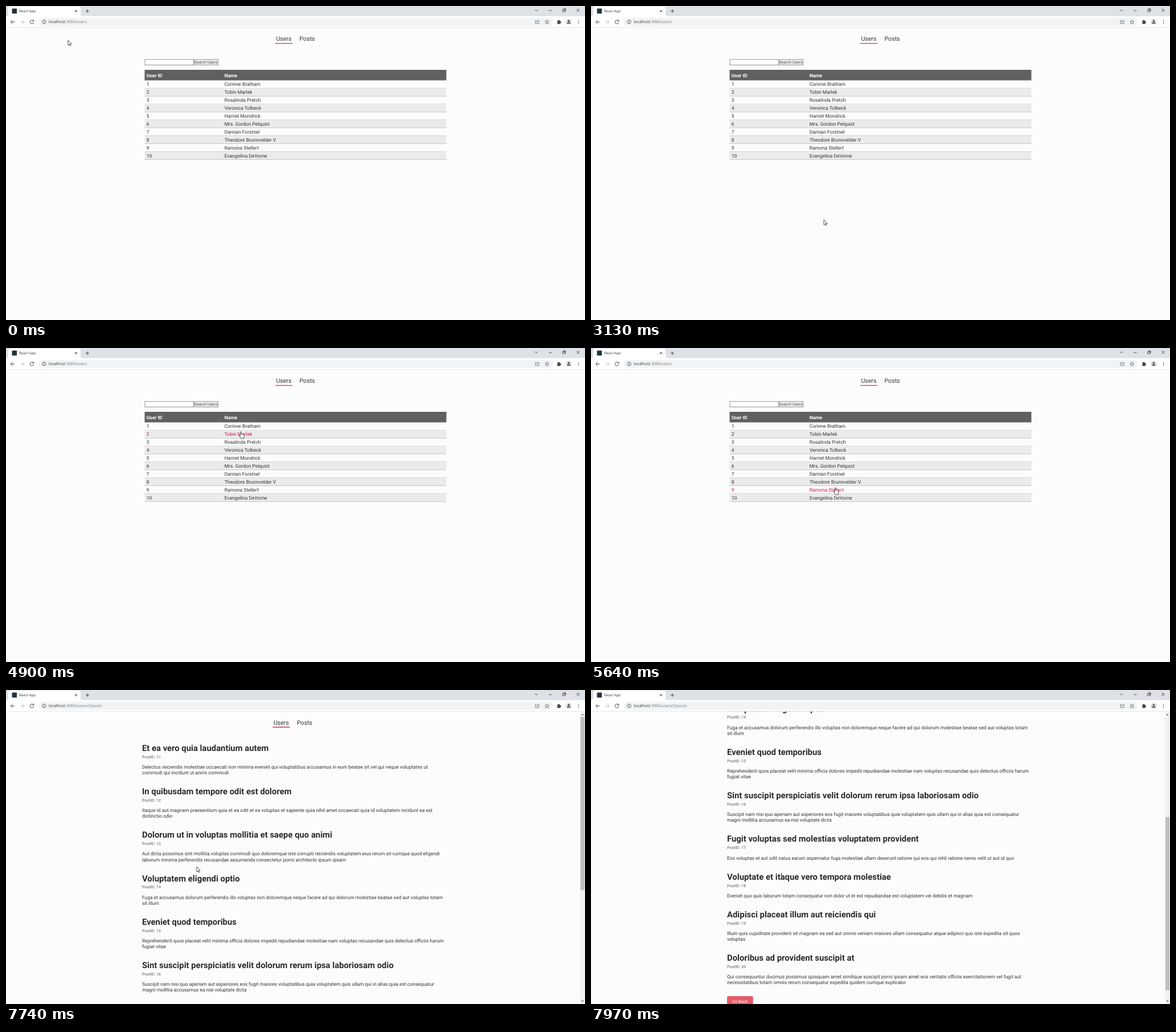
Write an HTML page that moves like this. It is 1017 px wide and 551 px high and loops after 8 s.

```html
<!DOCTYPE html>
<html lang="en">
<head>
<meta charset="utf-8">
<title>React App</title>
<style>
  html, body { margin: 0; width: 100%; height: 100%; overflow: hidden; background: #fcfcfc; }
  svg { display: block; position: absolute; left: 0; top: 0; }
  text { font-family: Roboto, sans-serif; font-size: 8.475px; fill: #333; white-space: pre; text-rendering: geometricPrecision; }
  .ui { font-family: "Open Sans", sans-serif; font-size: 6.95px; }
  .nav { font-size: 10.6px; }
  .th { font-weight: 700; fill: #fff; }
  .key { font-weight: 500; fill: #fff; }
  .btn { font-size: 7.42px; fill: #fff; }
  .title { font-size: 14.83px; font-weight: 700; fill: #2b2b2b; }
  .id { font-size: 7.05px; font-weight: 700; fill: #8c8c8c; }
  .hover text { fill: #d0145a; }
  .icon { fill: none; stroke: #45494d; stroke-width: 1; }
</style>
</head>
<body>
<svg id="stage" width="1017" height="551" viewBox="0 0 1017 551"></svg>
<script>
const LOOP = 8000, DETAIL_AT = 6670, POSTS_AT = 7100, HOVER_LAG = 60;
const ROW_TOP = 130.5, ROW_H = 13.9;

const people = ['Corinne Bratham', 'Tobin Marlek', 'Rosalinda Pretch', 'Veronica Tolbeck', 'Harriet Mondrick',
  'Mrs. Gordon Pelquist', 'Damian Forstnel', 'Theodore Brunnvelder V', 'Ramona Stellert', 'Evangelina DeVorne'];

const details = [['Name', people[1]], ['Username', 'Quillanne'], ['Email', 'Tamsy@velmora.test'],
  ['Address', 'Corbin Meadow, Suite 412, Tandelburgh, 30418-2257'], ['Phone', '000-555-0147 x20386'],
  ['Website', 'tamsyline.test'], ['Company', 'Brondel-Kusk']];

const posts = [
  ['Et ea vero quia laudantium autem',
    'Delectus reiciendis molestiae occaecati non minima eveniet qui voluptatibus accusamus in eum beatae sit vel qui neque voluptates ut',
    'commodi qui incidunt ut animi commodi'],
  ['In quibusdam tempore odit est dolorem',
    'Itaque id aut magnam praesentium quia et ea odit et ea voluptas et sapiente quia nihil amet occaecati quia id voluptatem incidunt ea est',
    'distinctio odio'],
  ['Dolorum ut in voluptas mollitia et saepe quo animi',
    'Aut dicta possimus sint mollitia voluptas commodi quo doloremque iste corrupti reiciendis voluptatem eius rerum sit cumque quod eligendi',
    'laborum minima perferendis recusandae assumenda consectetur porro architecto ipsum ipsam'],
  ['Voluptatem eligendi optio',
    'Fuga et accusamus dolorum perferendis illo voluptas non doloremque neque facere ad qui dolorum molestiae beatae sed aut voluptas totam',
    'sit illum'],
  ['Eveniet quod temporibus',
    'Reprehenderit quos placeat velit minima officia dolores impedit repudiandae molestiae nam voluptas recusandae quis delectus officiis harum',
    'fugiat vitae'],
  ['Sint suscipit perspiciatis velit dolorum rerum ipsa laboriosam odio',
    'Suscipit nam nisi quo aperiam aut asperiores eos fugit maiores voluptatibus quia voluptatem quis ullam qui in alias quia est consequatur',
    'magni mollitia accusamus ea nisi voluptate dicta'],
  ['Fugit voluptas sed molestias voluptatem provident',
    'Eos voluptas et aut odit natus earum aspernatur fuga molestiae ullam deserunt ratione qui eos qui nihil ratione nemo velit ut aut id quo'],
  ['Voluptate et itaque vero tempora molestiae',
    'Eveniet quo quis laborum totam consequatur non dolor ut et est repudiandae est voluptatem vel debitis et magnam'],
  ['Adipisci placeat illum aut reiciendis qui',
    'Illum quis cupiditate provident sit magnam ea sed aut omnis veniam maiores ullam consequatur atque adipisci quo iste expedita sit quos',
    'voluptas'],
  ['Doloribus ad provident suscipit at',
    'Qui consequuntur ducimus possimus quisquam amet similique suscipit porro ipsam amet eos veritatis officiis exercitationem vel fugit aut',
    'necessitatibus totam omnis rerum consequatur expedita quidem cumque explicabo']
];

// time, x, y of the pointer tip
const path = [
  [0, 109, 60], [150, 112, 62], [520, 400, 140], [800, 420, 255], [1030, 425, 122], [1100, 425, 126],
  [1160, 424, 162], [1380, 418, 255], [1640, 420, 138], [1960, 412, 260], [2250, 416, 140],
  [2520, 412, 245], [2900, 410, 345], [3130, 409, 375], [3300, 411, 250], [3520, 414, 140],
  [3800, 416, 255], [4120, 414, 140], [4480, 410, 371], [4800, 412, 152], [4900, 412.5, 147],
  [5100, 440, 146], [5350, 505, 210], [5600, 430, 255], [5820, 420, 150], [6120, 470, 255],
  [6420, 400, 151], [6640, 394, 149], [6770, 306.5, 253], [7080, 306.5, 253], [7350, 335, 310],
  [7750, 335, 310], [7970, 334.5, 327]
];
const scrollKeys = [[7745, 0], [7800, 45], [7970, 298]];

const rect = (x, y, w, h, fill, more = '') => `<rect x="${x}" y="${y}" width="${w}" height="${h}" fill="${fill}" ${more}/>`;
const text = (x, y, s, cls = '') => `<text x="${x}" y="${y}" class="${cls}">${s}</text>`;
const icon = (d, more = '') => `<path class="icon" d="${d}" ${more}/>`;
const button = (x, y, w, s) => rect(x, y, w, 17, '#e95864', 'rx="2"') + text(x + 9, y + 11.3, s, 'btn');
const nav = (x, y, color) => text(x, 61, 'Users', 'nav') + text(x + 41.1, 61, 'Posts', 'nav') + rect(x - 1.4, y, 30.4, 1.3, color);

function usersPage() {
  let s = nav(474.4, 65, '#e0345a')
    + rect(243.9, 93.9, 85.3, 9.7, '#fff', 'stroke="#7c7c7c" stroke-width=".8"')
    + rect(329.9, 93.9, 42.8, 9.7, '#efefef', 'stroke="#7c7c7c" stroke-width=".8"')
    + `<text x="330.6" y="101.3" style="font-size:6.98px;fill:#4a4a4a">Search Users</text>`
    + rect(243.5, 112, 530, 18.5, '#606062')
    + text(246.8, 124.6, 'User ID', 'th') + text(383.7, 124.6, 'Name', 'th');
  people.forEach((name, i) => {
    const y = ROW_TOP + i * ROW_H;
    if (i % 2) s += rect(243.5, y, 530, ROW_H, '#ebebeb');
    s += rect(243.5, y + ROW_H - .5, 530, .8, '#bcbcc2')
      + `<g class="row">${text(246.8, y + 9.9, i + 1) + text(383.7, y + 9.9, name)}</g>`;
  });
  return s;
}

function detailPage() {
  let s = nav(474.4, 65, '#e0345a') + rect(243.5, 93, 99.2, 134.4, '#606062');
  details.forEach(([key, value], i) => {
    const y = 93 + i * 19.17;
    s += text(246.8, y + 12.5, key, 'key') + text(346, y + 12.5, value) + rect(342.7, y + 18.6, 430.8, .8, '#bcbcc8');
  });
  return s + button(243.5, 246.2, 45.6, 'Go Back') + button(302, 246.2, 67.7, 'See Blog Posts');
}

function postsPage() {
  let s = nav(469.9, 64.5, '#b8144e'), y = 106.6;
  posts.forEach(([title, ...lines], i) => {
    s += text(239, y, title, 'title') + text(239, y + 12.9, 'PostID: ' + (11 + i), 'id');
    lines.forEach((line, n) => s += text(239, y + 31.1 + n * 10.25, line));
    y += lines.length > 1 ? 76.3 : 66.2;
  });
  return s + button(239, 835.2, 45.6, 'Go Back');
}

function chromeBar() {
  return rect(0, 0, 1017, 18, '#dee1e6')
    + '<path fill="#fff" d="M0 18q4 0 4-4V5q0-4 4-4H127q4 0 4 4v9q0 4 4 4z"/>'
    + rect(0, 17.8, 1017, 19.7, '#fff') + rect(0, 37.2, 1017, .7, '#dcdee0')
    + rect(10.5, 4.6, 8.6, 8.6, '#20343c', 'rx="1"')
    + `<text x="23" y="11.3" class="ui" style="font-size:6.2px">React App</text>`
    + icon('M121 7l4 4m0-4l-4 4M140 9h6m-3-3v6M929 6.3l2.6 2.6 2.6-2.6M953.5 8h5M1002.4 5l5 5m0-5l-5 5')
    + icon('M977.8 6.2h3.8v3.8h-3.8zM979.2 6V4.9h3.8v3.8h-1.2', 'stroke-width=".8"')
    + icon('M15.3 28H8.4m3.2-3.2L8.4 28l3.2 3.2')
    + icon('M25.2 28h6.9m-3.2-3.2l3.2 3.2-3.2 3.2', 'style="stroke:#babdc1"')
    + icon('M48.3 26a3.3 3.3 0 1 0 .5 2.6M48.9 24.4v2.3h-2.4')
    + rect(57.5, 21, 903, 14, '#f1f3f4', 'rx="7"')
    + '<circle class="icon" cx="67" cy="27.8" r="3.2" style="stroke-width:.8"/>' + icon('M67 27.3v2.2M67 25.8v.8', 'style="stroke-width:.8"')
    + '<text x="75" y="30.3" class="ui">localhost<tspan id="url" fill="#74787c"></tspan></text>'
    + icon('M932.3 25.5h-2.3v5.3h6.4v-1.6M932.2 29q.2-2.7 4-2.7m-1.4-1.8l1.8 1.8-1.8 1.8', 'style="stroke-width:.7"')
    + icon('M950.3 24.4l1 2.4 2.6.2-2 1.7.7 2.6-2.3-1.4-2.3 1.4.7-2.6-2-1.7 2.6-.2z', 'style="stroke-width:.7"')
    + '<path fill="#45494d" d="M968 25.7h1.7a1.2 1.2 0 0 1 2.4 0h1.8v1.7a1.2 1.2 0 0 1 0 2.4v1.7H968v-1.9a1 1 0 0 0 0-2z"/>'
    + '<circle cx="988.4" cy="27.8" r="5.3" fill="#dcdfe4"/><circle cx="988.4" cy="26.2" r="1.6" fill="#45494d"/>'
    + '<path fill="#45494d" d="M985.2 30.8q0-2.3 3.2-2.3t3.2 2.3z"/>'
    + [25.3, 27.8, 30.3].map(y => `<circle cx="1005.6" cy="${y}" r=".8" fill="#45494d"/>`).join('');
}

const pointers = {
  arrow: '<path d="M0 0V9L2 7.2l1.4 3 1.3-.6L3.4 6.7H6.2z"',
  hand: '<path d="M-.9 7V.8a.9.9 0 0 1 1.8 0V4l4.2.9q1 .3.8 1.6L5.2 10v2h-5l-.4-1.6L-3 7q-.4-1 .6-1z"',
  beam: '<path d="M-1.5-4.5h3M0-4.5v9M-1.5 4.5h3"'
};

const stage = document.getElementById('stage');
stage.innerHTML = `<g id="users">${usersPage()}</g><g id="detail">${detailPage()}</g>
  <g id="posts"><g id="content">${postsPage()}</g>${rect(1008.3, 38, 8.7, 513, '#f1f1f1')}
  <rect id="thumb" x="1009" y="47" width="7.2" height="304" fill="#bfbfbf"/>
  <path fill="#666" d="M1010.3 44.3l2.3-2.6 2.3 2.6zM1010.3 545l2.3 2.6 2.3-2.6z"/></g>
  ${chromeBar()}<g id="pointer">${Object.entries(pointers).map(([id, p]) =>
    `${p} id="${id}" fill="#fff" stroke="#26262c" stroke-width=".8" stroke-linejoin="round"/>`).join('')}</g>`;

const $ = id => document.getElementById(id);
const show = (el, on) => el.setAttribute('visibility', on ? 'visible' : 'hidden');
const rows = [...document.querySelectorAll('.row')];
const els = Object.fromEntries(['users', 'detail', 'posts', 'content', 'thumb', 'pointer', 'url', ...Object.keys(pointers)].map(id => [id, $(id)]));
const smooth = u => u * u * (3 - 2 * u);

function sample(keys, t, ease = u => u) {
  if (t <= keys[0][0]) return keys[0].slice(1);
  const i = keys.findIndex(k => k[0] > t);
  if (i < 0) return keys[keys.length - 1].slice(1);
  const a = keys[i - 1], b = keys[i], u = ease((t - a[0]) / (b[0] - a[0]));
  return a.slice(1).map((v, n) => v + (b[n + 1] - v) * u);
}

function hoveredRow(t) {
  const [x, y] = sample(path, Math.max(0, t - HOVER_LAG), smooth);
  const row = Math.floor((y - ROW_TOP) / ROW_H);
  return x > 243.5 && x < 773.5 && row >= 0 && row < people.length ? row : -1;
}

function draw(t) {
  const page = t < DETAIL_AT ? 'users' : t < POSTS_AT ? 'detail' : 'posts';
  for (const id of ['users', 'detail', 'posts']) show(els[id], id === page);
  els.url.textContent = ':3000/users' + { users: '', detail: '/2', posts: '/2/posts' }[page];

  const row = page === 'users' ? hoveredRow(t) : -1;
  rows.forEach((el, i) => el.classList.toggle('hover', i === row));

  const [scroll] = sample(scrollKeys, t);
  els.content.setAttribute('transform', `translate(0 ${-scroll})`);
  els.thumb.setAttribute('y', 47 + scroll * .591);

  const [x, y] = sample(path, t, smooth);
  els.pointer.setAttribute('transform', `translate(${x} ${y})`);
  const kind = row >= 0 || (page === 'detail' && t > 6720) ? 'hand' : t > 7880 ? 'beam' : 'arrow';
  for (const id in pointers) show(els[id], id === kind);
}

const start = performance.now();
function tick() {
  draw((performance.now() - start) % LOOP);
  requestAnimationFrame(tick);
}
tick();
</script>
</body>
</html>
```
